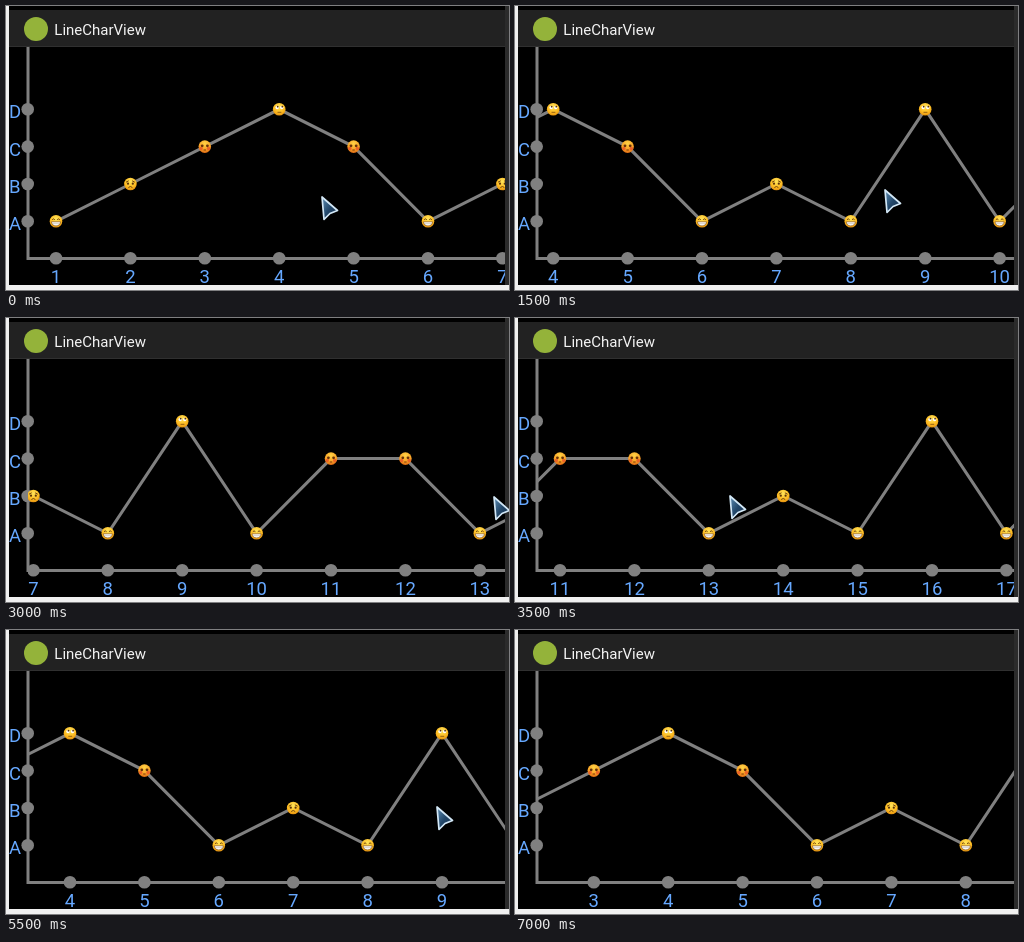
An HTML page for the animation above (7.5 s loop, 503 px wide and 284 px high).

```html
<!DOCTYPE html>
<html lang="en">
<head>
<meta charset="utf-8">
<title>LineCharView</title>
<style>
  html, body { margin: 0; width: 100%; height: 100%; overflow: hidden; background: #f0f0f0; }
  svg { display: block; width: 503px; height: 284px; }
  text { font-family: Roboto, "Open Sans", sans-serif; }
  .label { font-size: 18.5px; fill: #66a8ff; }
  .axis { fill: none; stroke: #808080; stroke-width: 3; }
  .dot { fill: #808080; }
</style>
</head>
<body>
<svg viewBox="0 0 503 284">
  <defs>
    <radialGradient id="skin" cx=".5" cy=".3" r=".75">
      <stop offset="0" stop-color="#ffe45a"/>
      <stop offset=".6" stop-color="#fdbb22"/>
      <stop offset="1" stop-color="#e08a0c"/>
    </radialGradient>
    <radialGradient id="warm" cx=".5" cy=".25" r=".8">
      <stop offset="0" stop-color="#ffd345"/>
      <stop offset=".55" stop-color="#f9a528"/>
      <stop offset="1" stop-color="#dd6512"/>
    </radialGradient>
    <linearGradient id="steel" x1="0" y1="0" x2="1" y2="1">
      <stop offset="0" stop-color="#5f8fb5"/>
      <stop offset=".5" stop-color="#23486b"/>
      <stop offset="1" stop-color="#142c47"/>
    </linearGradient>
    <clipPath id="plot"><rect x="22" y="41" width="477" height="238"/></clipPath>

    <g id="A">
      <circle r="6.3" fill="url(#skin)"/>
      <path d="M-3.8-1.6q1.2-1.7 2.6 0M1.2-1.6q1.2-1.7 2.6 0" fill="none" stroke="#70430c"/>
      <path d="M-4.6.5H4.6Q4 4.6 0 4.6T-4.6.5Z" fill="#fff" stroke="#8b5a1c" stroke-width=".7"/>
      <path d="M-4 2.4H4" stroke="#a89f90" stroke-width=".5"/>
    </g>
    <g id="B">
      <circle r="6.3" fill="url(#skin)"/>
      <path d="M-4.4-1.8L-1.7-3.2M4.4-1.8L1.7-3.2M-2 3.5q2-2 4 0" fill="none" stroke="#70430c"/>
      <circle cx="-2.4" cy="-.3" r="1.1" fill="#5a320a"/>
      <circle cx="2.4" cy="-.3" r="1.1" fill="#5a320a"/>
    </g>
    <g id="C">
      <circle r="6.3" fill="url(#warm)"/>
      <circle cx="-3.7" cy="1.8" r="1.7" fill="#e9502a" opacity=".75"/>
      <circle cx="3.7" cy="1.8" r="1.7" fill="#e9502a" opacity=".75"/>
      <circle cx="-2.6" cy="-.8" r="1.4" fill="#66300a"/>
      <circle cx="2.6" cy="-.8" r="1.4" fill="#66300a"/>
      <path d="M-1.2 3.4H1.2" stroke="#7b3908"/>
    </g>
    <g id="D">
      <circle r="6.3" fill="url(#skin)"/>
      <circle cx="-2" cy="-1.8" r="1.7" fill="#fff"/>
      <circle cx="2.6" cy="-1.8" r="1.7" fill="#fff"/>
      <circle cx="-1.5" cy="-2.6" r=".9" fill="#5a320a"/>
      <circle cx="3.1" cy="-2.6" r=".9" fill="#5a320a"/>
      <path d="M-1.7 3H2.2" stroke="#8a5710" stroke-width=".9"/>
    </g>
  </defs>

  <rect x="3" width="496" height="279"/>
  <rect x="499" width="4" height="279" fill="#2b2b2b"/>
  <rect x="3" y="4" width="496" height="36" fill="#222"/>
  <path d="M3 40.5H499" stroke="#303030"/>
  <circle cx="30" cy="23" r="12" fill="#94b33a"/>
  <text x="48.3" y="29" font-size="15" fill="#f3f3f3">LineCharView</text>

  <path class="axis" d="M22 41V252.5H499"/>
  <g id="levels"></g>
  <g clip-path="url(#plot)"><g id="chart"></g></g>
  <path id="pointer" d="M0 0L2 22.5L8 16.5L15.5 13.5Z" fill="url(#steel)"
        stroke="#d3e8f7" stroke-width="1.7" stroke-linejoin="round"/>
</svg>
<script>
const GAP = 74.4, STEP = 500;
const values = "ABCDCABADACCABADACC";
const levelY = { A: 215.3, B: 178, C: 140.6, D: 103.3 };
// One row per step: scroll offset, pointer x, pointer y (no pointer when omitted)
const steps = [
  [0, 316, 191], [-90, 260, 191], [-197, 153, 191],
  [-235, 370, 184], [-340, 265, 181], [-439.4, 169, 179],
  [-469, 488, 179], [-749, 215, 178], [-640, 320, 178],
  [-516.8, 429, 178], [-466, 480, 178], [-209.2, 431, 177],
  [0, 345, 178], [-15, 330, 178], [-120]
];
const byId = id => document.getElementById(id);
const dot = (x, y) => `<circle class="dot" cx="${x}" cy="${y}" r="6.3"/>`;
const label = (x, y, s, anchor) =>
  `<text class="label" x="${x}" y="${y}" text-anchor="${anchor}">${s}</text>`;

byId("levels").innerHTML = Object.entries(levelY)
  .map(([name, y]) => dot(21.7, y) + label(3, y + 9, name, "start")).join("");

const points = [...values].map((v, i) => ({ v, x: 50 + i * GAP, y: levelY[v] }));
byId("chart").innerHTML =
  `<polyline class="axis" points="${points.map(p => `${p.x},${p.y}`).join(" ")}"/>` +
  points.map((p, i) =>
    dot(p.x, 252.3) + label(p.x, 277, i + 1, "middle") +
    `<use href="#${p.v}" x="${p.x}" y="${p.y}"/>`).join("");

const chart = byId("chart"), pointer = byId("pointer");
const start = performance.now();
function draw(now) {
  const index = Math.floor(Math.max(0, now - start) / STEP) % steps.length;
  const [offset, x, y] = steps[index];
  chart.setAttribute("transform", `translate(${offset})`);
  pointer.setAttribute("visibility", x === undefined ? "hidden" : "visible");
  if (x !== undefined) pointer.setAttribute("transform", `translate(${x} ${y})`);
  requestAnimationFrame(draw);
}
draw(start);
</script>
</body>
</html>
```
